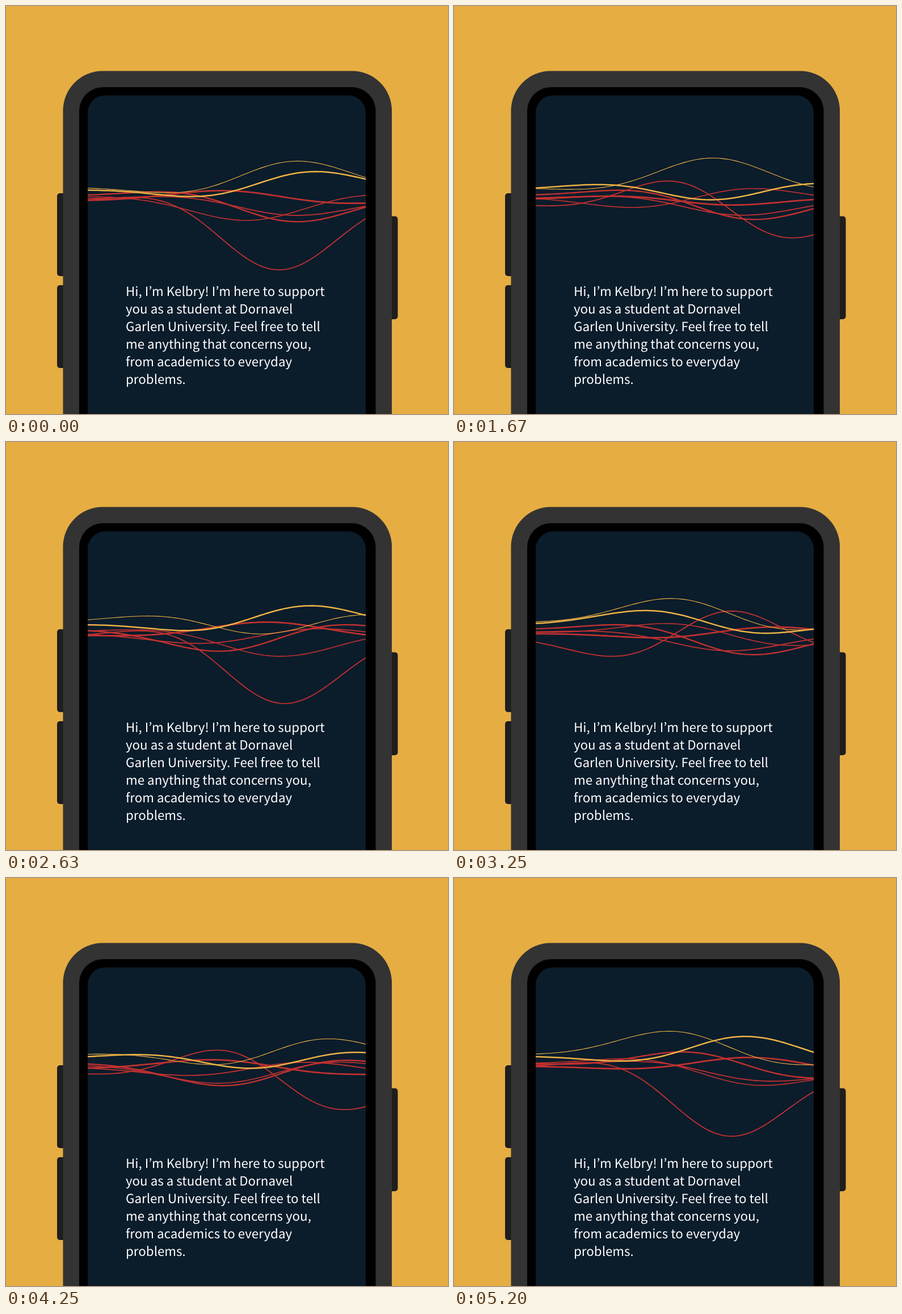
These frames come from a looping animation (779x719 px, 5270 ms). An HTML page:

```html
<!DOCTYPE html>
<html lang="en">
<head>
<meta charset="utf-8">
<title>Assistant greeting</title>
<style>
  html, body { margin: 0; width: 100%; height: 100%; overflow: hidden; background: #e6ad42; }
  svg { display: block; }
  text {
    font: 22.35px "Noto Sans CJK KR", "Noto Sans CJK JP", "Noto Sans CJK SC", "Noto Sans CJK", "Noto Sans", sans-serif;
    font-variant-east-asian: proportional-width;
    text-rendering: geometricPrecision;
    fill: #fff;
  }
</style>
</head>
<body>
<svg width="779" height="719" viewBox="0 0 779 719">
  <defs>
    <clipPath id="screen"><rect x="144" y="157.500" width="490" height="620" rx="31"/></clipPath>
  </defs>
  <g fill="#1e1e1e">
    <rect x="90" y="330" width="20" height="146" rx="5"/>
    <rect x="90" y="492" width="20" height="146" rx="5"/>
    <rect x="670" y="370.500" width="20.500" height="181.500" rx="5"/>
  </g>
  <rect x="100.500" y="114.500" width="579.500" height="700" rx="70" fill="#333"/>
  <rect x="129" y="143" width="522.500" height="660" rx="42"/>
  <rect x="144" y="157.500" width="490" height="620" rx="31" fill="#0b1c2b"/>
  <g id="waves" fill="none" clip-path="url(#screen)"></g>
  <g id="message"></g>
</svg>
<script>
  const LOOP = 5270, STEP = 1000 / 24, LAST = 125;
  const LEFT = 143, RIGHT = 635, TURN = 2 * Math.PI;
  const svg = 'http://www.w3.org/2000/svg';

  function add(parent, tag, attrs) {
    const node = document.createElementNS(svg, tag);
    for (const key in attrs) node.setAttribute(key, attrs[key]);
    return document.getElementById(parent).appendChild(node);
  }

  [
    'Hi, I’m Kelbry! I’m here to support',
    'you as a student at Dornavel',
    'Garlen University. Feel free to tell',
    'me anything that concerns you,',
    'from academics to everyday',
    'problems.'
  ].forEach((line, i) => {
    add('message', 'text', { x: 211, y: 511 + 31 * i }).textContent = line;
  });

  // The strands of a bundle start evenly spaced at the left and share one wavelength.
  // Negative swings bulge upwards; lag is in degrees at x = 494.
  const red = { color: '#c23130', top: 334, gap: 3, wavelength: 655 };
  const gold = { color: '#edb245', top: 321, gap: 5, wavelength: 590 };
  red.strands = [
    { width: 2.4, swing: 35, period: 1600, lag: -30 },
    { width: 1.6, swing: 30, period: 2270, lag: 55 },
    { width: 1.8, swing: 22, period: 1690, lag: -30 },
    { width: 2.7, swing: -16, period: 2170, lag: 95 },
    { width: 1.8, swing: 83, period: 1297, lag: 0 }
  ];
  gold.strands = [
    { width: 1.1, swing: -36, period: 1970, lag: -30 },
    { width: 2.5, swing: -30, period: 1325, lag: -60 }
  ];

  const waves = [red, gold].flatMap(({ color, top, gap, wavelength, strands }) =>
    strands.map((strand, i) => ({
      ...strand, wavelength, base: top + gap * i,
      path: add('waves', 'path', { stroke: color, 'stroke-width': strand.width })
    })));

  const bulge = x => Math.exp(-(((x - 464) / 147) ** 2) / 2);

  // The whole picture slowly rises, held back near its right end.
  const rise = (x, t) => 0.4 * (t / 1000) ** 2 * (1 - 0.8 * ((x - LEFT) / 490) ** 4);

  function height(x, t, { base, swing, wavelength, period, lag }) {
    const phase = TURN * ((x - 494) / wavelength + lag / 360 - t / period);
    return base - rise(x, t) + swing * bulge(x) * (0.45 + Math.cos(phase));
  }

  function draw(now) {
    const t = Math.min(LAST, Math.floor((now % LOOP + 9) / STEP)) * STEP;
    for (const wave of waves) {
      const points = [];
      for (let x = LEFT; x <= RIGHT; x += 6) points.push(x + ' ' + height(x, t, wave).toFixed(2));
      wave.path.setAttribute('d', 'M' + points.join('L'));
    }
  }

  const start = performance.now();
  function tick() {
    draw(performance.now() - start);
    requestAnimationFrame(tick);
  }
  tick();
</script>
</body>
</html>
```
